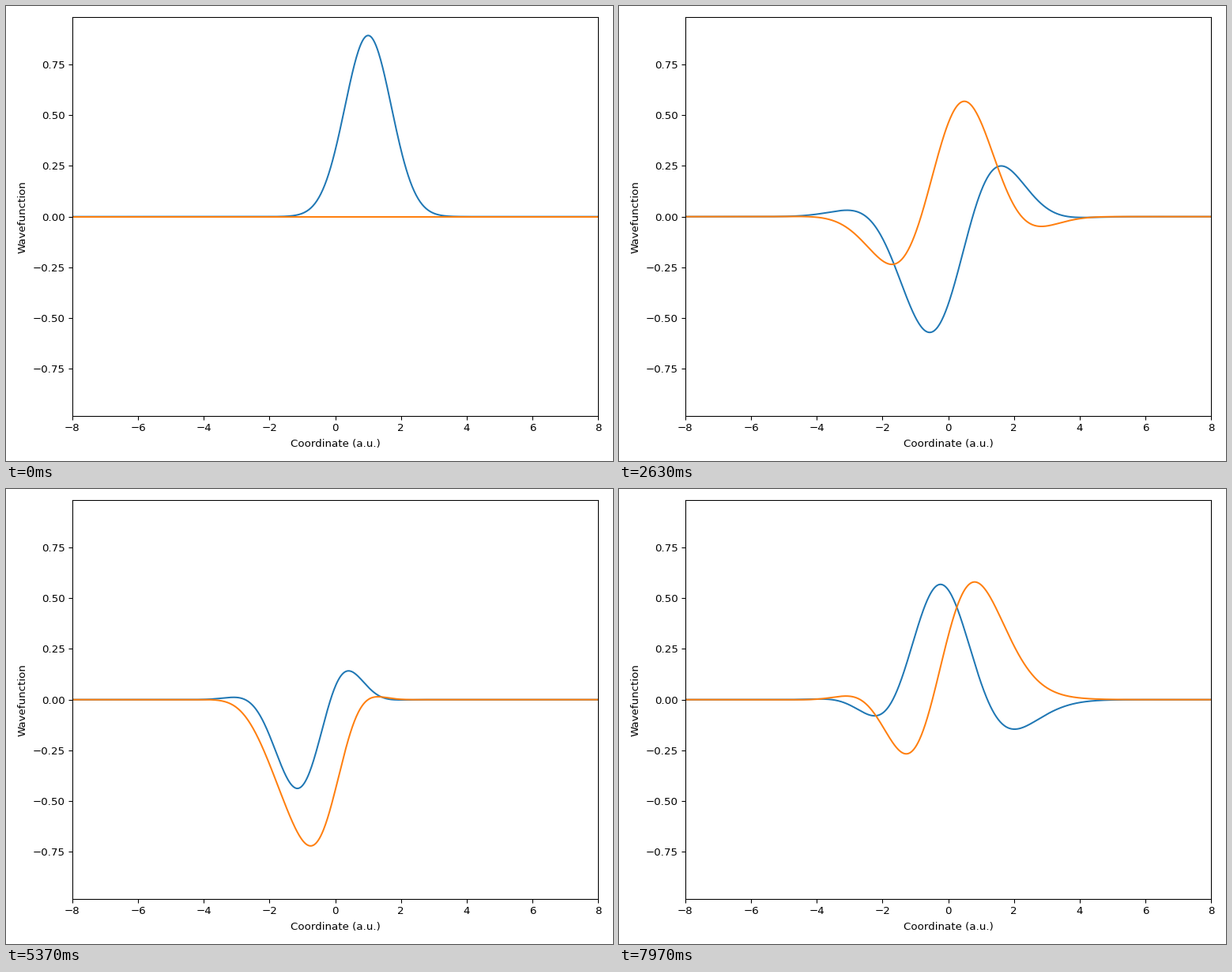
A matplotlib script that plays this animation: 768 px wide and 576 px high, repeating every 8 s.

```python
import numpy as np
import matplotlib.pyplot as plt
from matplotlib.animation import FuncAnimation

W, H = 768, 576
LOOP = 8000   # ms
TICK = 20     # ms between redraws
STEPS = 240   # time steps per loop
DT = 0.1      # length of one time step (a.u.)
A0 = 2.0      # initial Gaussian exponent: exp(-A0 (x - X0)^2 / 2)
X0 = 1.0
NORM = (A0 / np.pi) ** 0.25

x = np.linspace(-8, 8, 801)


def wavefunction(t):
    """Displaced, squeezed Gaussian in a harmonic well (m = omega = 1)."""
    c, s = np.cos(t), np.sin(t)
    q, p = X0 * c, -X0 * s
    z = c + 1j * A0 * s
    a = (A0 * c + 1j * s) / z
    # continuous argument of z, so the square root keeps its branch
    angle = t + np.arctan2((A0 - 1) * s * c, c * c + A0 * s * s)
    d = x - q
    phase = p * d + p * q / 2 - angle / 2
    return NORM / np.sqrt(abs(z)) * np.exp(-a / 2 * d**2 + 1j * phase)


fig, ax = plt.subplots(figsize=(W / 96, H / 96), dpi=96)
fig.subplots_adjust(left=83.9 / W, right=749.35 / W,
                    bottom=1 - 518.95 / H, top=1 - 14.4 / H)
psi = wavefunction(0.0)
real_line, = ax.plot(x, psi.real)
imag_line, = ax.plot(x, psi.imag)
ax.set_xlim(-8, 8)
ax.set_ylim(-1.1 * NORM, 1.1 * NORM)
ax.set_xlabel("Coordinate (a.u.)", labelpad=4.75)
ax.set_ylabel("Wavefunction", labelpad=4.75)


def update(frame):
    step = round(frame * TICK * STEPS / LOOP)
    psi = wavefunction(step * DT)
    real_line.set_ydata(psi.real)
    imag_line.set_ydata(psi.imag)
    return real_line, imag_line


anim = FuncAnimation(fig, update, frames=LOOP // TICK, interval=TICK,
                     repeat=True, repeat_delay=0)
plt.show()
```
